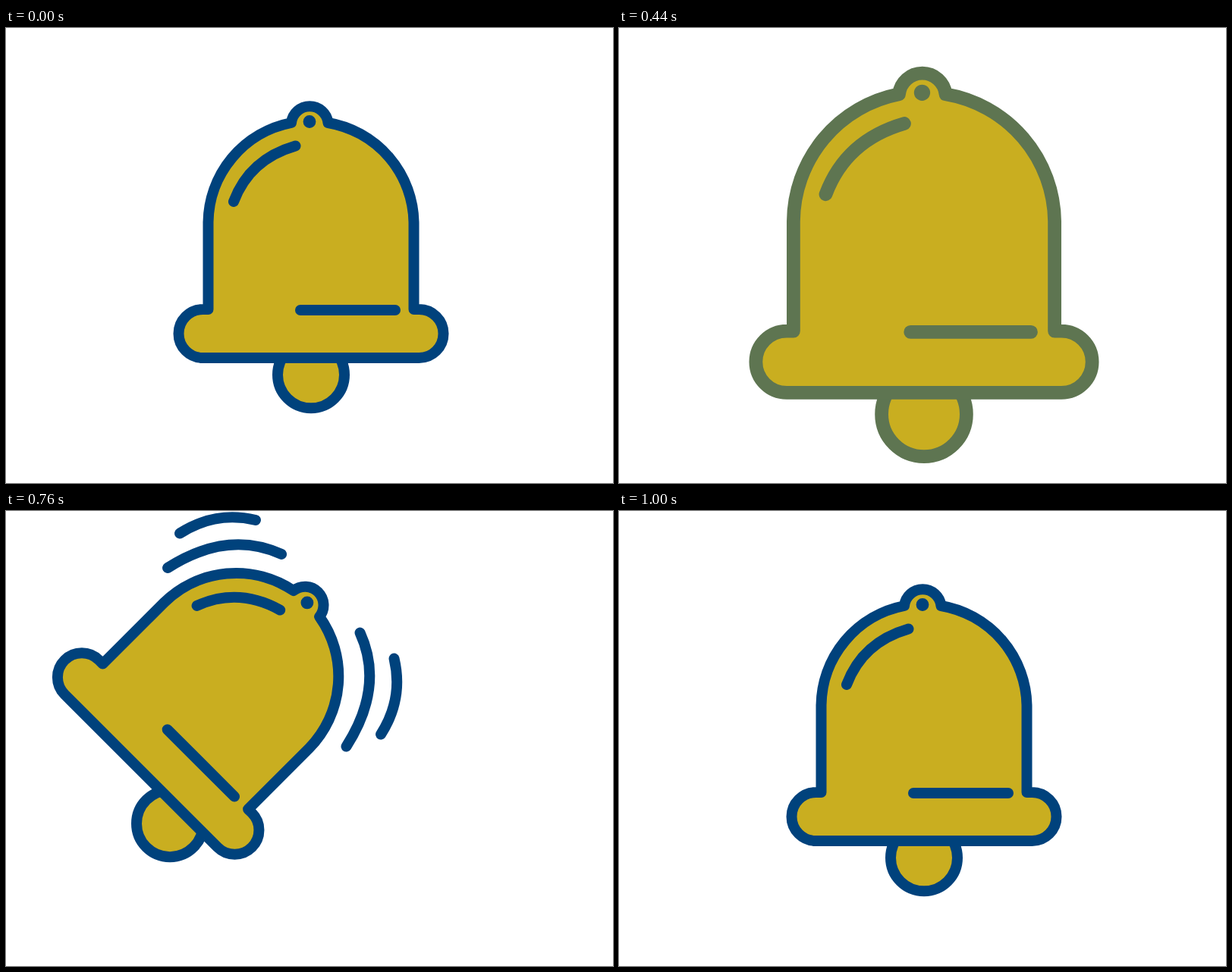
Animation, 800 px wide and 600 px high, one loop 1520 ms. Source, as an HTML page:

```html
<!DOCTYPE html>
<html lang="en">
<head>
<meta charset="utf-8">
<title>Ringing bell</title>
<style>
  html, body { margin: 0; width: 100%; height: 100%; overflow: hidden; background: #fff; }
  svg { display: block; width: 800px; height: 600px; }
  #bell { stroke-width: 14; stroke-linecap: round; stroke-linejoin: round; }
  .line { fill: none; }
</style>
</head>
<body>
<svg viewBox="0 0 800 600">
  <defs>
    <path id="waves" d="M330.8 102.2Q257.6 129.5 237.5 221M274.9 94.5Q228.6 123.1 216.6 177.5"/>
  </defs>
  <g id="bell">
    <circle id="clapper" cx="402" cy="457.3" r="44"/>
    <path d="M266.5 371H259.5A32 32 0 0 0 259.5 435H544.5A32 32 0 0 0 544.5 371H537.5V257
             A135.5 135.5 0 0 0 424.5 125A24.4 24.4 0 0 0 376 125A135.5 135.5 0 0 0 266.5 257Z"/>
    <g id="details" class="line">
      <path d="M381.5 155.5Q321 173 300 229M388 372H513"/>
      <circle cx="400" cy="123.5" r="4.2" stroke-width="8.4"/>
    </g>
    <g id="ringing" class="line">
      <use href="#waves"/>
      <use href="#waves" transform="translate(808) scale(-1 1)"/>
    </g>
  </g>
</svg>
<script>
  const LOOP = 1520, STEP = 40;
  const NAVY = [0, 66, 124], GOLD = [201, 174, 32], GRAY = [203, 203, 203];

  // time, bell angle, clapper offset along the rim
  const SWING = [
    [560, 0, 0], [640, -45, -75], [760, 45, 76], [840, -15, -45],
    [880, -3, -12], [920, 3.7, 8], [1000, 0, 0]
  ];

  const [bell, clapper, details, ringing] =
    ['bell', 'clapper', 'details', 'ringing'].map(id => document.getElementById(id));

  const lerp = (a, b, k) => a + (b - a) * k;
  const tinted = (color, k) => `rgb(${color.map((c, i) => Math.round(lerp(c, GOLD[i], k)))})`;
  const show = (node, on) => node.setAttribute('visibility', on ? 'visible' : 'hidden');

  function swingAt(t) {
    const i = SWING.findIndex(key => key[0] > t);
    if (i < 1) return [0, 0];
    const [a, b] = [SWING[i - 1], SWING[i]];
    const k = (t - a[0]) / (b[0] - a[0]);
    return [lerp(a[1], b[1], k), lerp(a[2], b[2], k)];
  }

  function draw(now) {
    const t = Math.floor(now % LOOP / STEP) * STEP;
    const muted = t >= 40 && t < 440;
    const rise = t <= 440 ? (t - 320) / 120 : (520 - t) / 80;
    const pulse = Math.max(0, rise) ** 2;
    const [angle, slide] = swingAt(t);

    bell.setAttribute('transform', `rotate(${angle} 401.5 118.5)
      translate(402 265) scale(${1 + 0.27 * pulse}) translate(-402 -265)`);
    bell.setAttribute('fill', tinted(muted ? GRAY : GOLD, 0.47 * pulse));
    bell.setAttribute('stroke', tinted(NAVY, 0.47 * pulse));
    clapper.setAttribute('transform', `translate(${slide})`);
    show(details, !muted);
    show(ringing, t >= 600 && t < 1000);
  }

  const start = performance.now();
  (function tick() {
    draw(performance.now() - start);
    requestAnimationFrame(tick);
  })();
</script>
</body>
</html>
```
